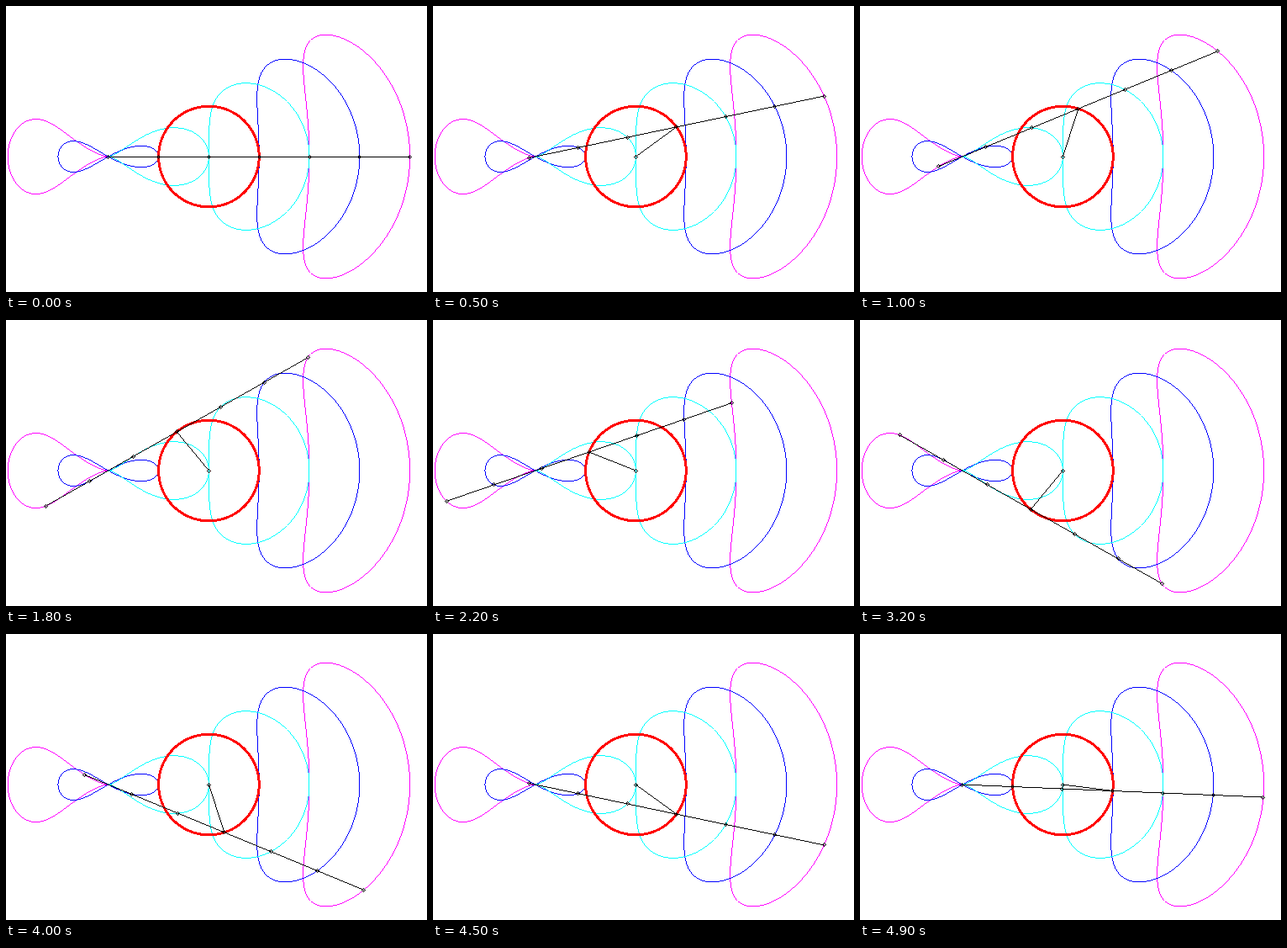
A matplotlib script for the animation above (5 s loop, 501 px wide and 340 px high).

```python
import numpy as np
import matplotlib.pyplot as plt
from matplotlib.animation import FuncAnimation

W, H, DPI = 501, 340, 64
FRAMES, INTERVAL = 50, 100

RADIUS = 59.81
POLE = np.array([121.76, 179.02])
CENTER = POLE + [2 * RADIUS, 0]

WHITE, BLACK, RED = (255, 255, 255), (0, 0, 0), (255, 0, 0)
CYAN, BLUE, MAGENTA = (0, 255, 255), (0, 0, 255), (255, 0, 255)


def conchoid(theta, k):
    """Point k radii beyond the circle point, along the ray from the pole."""
    arm = RADIUS * np.array([2 + np.cos(theta), -np.sin(theta)])
    length = np.hypot(*arm)
    return POLE + (arm * (1 + k * RADIUS / length)).T


def stroke(canvas, points, color):
    """One-pixel polyline, sampled at pixel centers along its longer axis."""
    for a, b in zip(points[:-1], points[1:]):
        major = np.argmax(np.abs(b - a))
        low, high = sorted((a[major], b[major]))
        along = np.arange(np.ceil(low - 0.5), np.ceil(high - 0.5)) + 0.5
        if along.size:
            t = (along - a[major]) / (b[major] - a[major])
            x, y = np.floor(a + (b - a) * t[:, None]).astype(int).T
            canvas[y, x] = color


def diamond(canvas, point):
    x, y = np.floor(point).astype(int)
    for dx in range(-2, 3):
        dy = 2 - abs(dx)
        canvas[[y - dy, y + dy], x + dx] = BLACK


def make_background():
    canvas = np.full((H, W, 3), WHITE, dtype=np.uint8)
    theta = np.linspace(0, 2 * np.pi, 401)
    for k, color in ((3, MAGENTA), (2, BLUE), (1, CYAN)):
        for side in (k, -k):
            stroke(canvas, conchoid(theta, side), color)
    y, x = np.mgrid[:H, :W] + 0.5
    distance = np.hypot(x - CENTER[0], y - CENTER[1])
    canvas[np.abs(distance - RADIUS) < 1.5] = RED
    return canvas


background = make_background()

fig = plt.figure(figsize=(W / DPI, H / DPI), dpi=DPI, facecolor="white")
ax = fig.add_axes([0, 0, 1, 1])
ax.axis("off")
picture = ax.imshow(background, interpolation="nearest", aspect="auto")


def update(frame):
    theta = 2 * np.pi * frame / FRAMES
    canvas = background.copy()
    joints = [conchoid(theta, k) for k in range(-3, 4)]
    stroke(canvas, [joints[0], joints[-1]], BLACK)
    stroke(canvas, [CENTER, joints[3]], BLACK)
    for point in joints + [CENTER]:
        diamond(canvas, point)
    picture.set_data(canvas)
    return (picture,)


anim = FuncAnimation(fig, update, frames=FRAMES, interval=INTERVAL,
                     repeat=True, repeat_delay=0)
plt.show()
```
